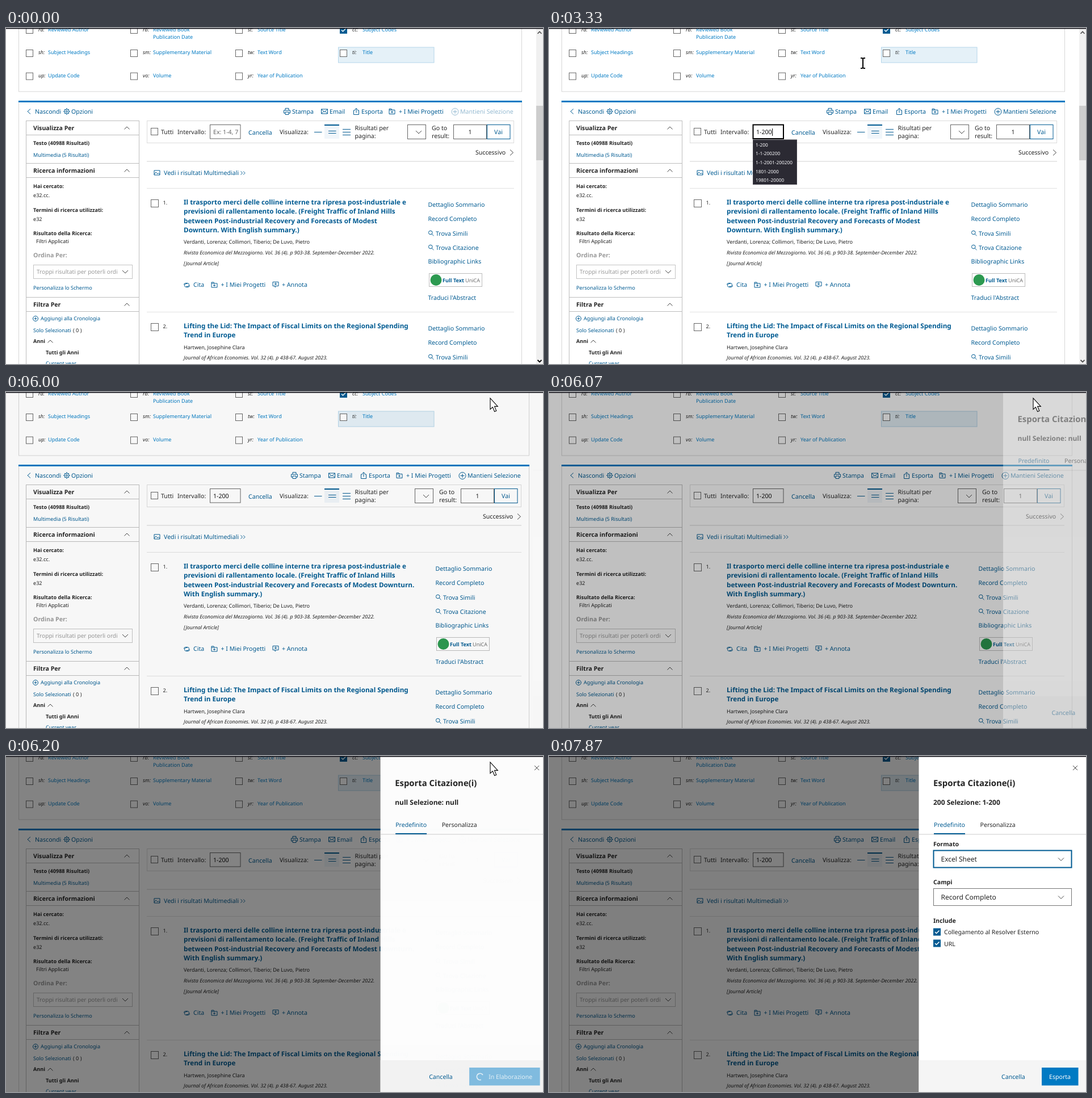
An HTML page for the animation above (8000 ms loop, 946 by 592 pixels).

```html
<!DOCTYPE html>
<html lang="it">
<head>
<meta charset="utf-8">
<title>Esporta citazioni</title>
<style>
html, body { margin: 0; width: 100%; height: 100%; overflow: hidden; background: #fff; }
svg { display: block; width: 946px; height: 592px; }
text { font: 10.6px "Noto Sans", "Open Sans", sans-serif; fill: #232323; text-rendering: geometricPrecision; }
text.s { font-size: 9.1px; }
text.b { font-weight: 600; }
text.i { font-size: 8.95px; font-style: italic; }
text.t { font-size: 11.7px; font-weight: 600; }
text.f { font-size: 12px; }
text.h { font-size: 14.9px; }
text.p { font-size: 10.1px; }
text.o { font-size: 8.3px; fill: #fbfbfe; }
text.m { text-anchor: middle; }
text.l { fill: #005b92; }
text.k { fill: #007ac3; }
text.g { fill: #999; }
text.w { fill: #fff; }
.ico { fill: none; stroke: #005b92; stroke-width: 1; }
.dark { stroke: #444; }
</style>
</head>
<body>
<svg id="stage" viewBox="0 0 946 592"></svg>
<script>
const BLUE = '#005b92', LOOP = 8000, SCROLLBAR = 13;

const text = (x, y, s, cls = '', more = '') => `<text x="${x}" y="${y}" class="${cls}" ${more}>${s}</text>`;
const rect = (x, y, w, h, fill = 'none', stroke = 'none', more = '') =>
  `<rect x="${x}" y="${y}" width="${w}" height="${h}" fill="${fill}" stroke="${stroke}" ${more}/>`;
const icon = (x, y, d, more = '') => `<path class="ico ${more}" transform="translate(${x} ${y})" d="${d}"/>`;
const group = (attrs, ...parts) => `<g ${attrs}>${parts.join('')}</g>`;
// A box whose right edge follows the page width
const wide = (x, y, w, h, fill, stroke) => rect(x, y, w, h, fill, stroke, `class="wide" data-w="${w}"`);
const box = (x, y, size = 12) => rect(x + .5, y + .5, size, size, '#fff', '#666');
const checked = (x, y) => rect(x, y, 13, 13, BLUE) +
  `<path d="M${x + 3} ${y + 6.5}l2.5 2.5 5-5" fill="none" stroke="#fff" stroke-width="1.5"/>`;

const UP = 'M-4.5 2.5L0-2 4.5 2.5', DOWN = 'M-5-2.5L0 2.5 5-2.5', RIGHT = 'M-3-5L2.5 0-3 5', LEFT = 'M3-4.5L-2 0 3 4.5';
const CIRCLE_PLUS = 'M-6 0a6 6 0 1 0 12 0a6 6 0 1 0-12 0M-3.5 0h7M0-3.5v7';
const FOLDER = 'M-5-2.5v7h10v-7zM-5-2.5v-2h4l1 2M-2 1h4M0-1v4';
const LENS = 'M-4-1a3.3 3.3 0 1 0 6.6 0a3.3 3.3 0 1 0-6.6 0M1.8 1.5L5 4.7';

function searchFields() {
  const cols = [35, 219, 404, 588], labelX = [74, 259, 443, 628];
  const rows = [
    [-3, 5.5, ['ra', 'Reviewed Author'], ['rb', 'Reviewed Book'], ['st', 'Source Title'], ['cc', 'Subject Codes']],
    [38, 45.5, ['sh', 'Subject Headings'], ['sm', 'Supplementary Material'], ['tw', 'Text Word'], ['ti', 'Title']],
    [78.5, 86.5, ['up', 'Update Code'], ['vo', 'Volume'], ['yr', 'Year of Publication']]
  ];
  const cells = rows.map(([boxY, y, ...fields]) => fields.map(([code, label], c) =>
    (code == 'cc' ? checked(cols[c], boxY) : box(cols[c], boxY)) +
    text(cols[c] + 22, y, code + ':', 'i') + text(labelX[c], y, label, 's k')).join(''));
  return wide(22.5, -5, 886, 117, '#fff', '#d6d6d6') + rect(585.5, 34, 168.5, 27, '#e5f1f8', '#b5d6ea') +
    cells.join('') + text(259, 19, 'Publication Date', 's k');
}

function sidebar() {
  const head = (y, label) => rect(35.5, y - 12.5, 199, 25, '#fff', '#bdbdbd') + text(48, y + 4, label, 'b') + icon(213, y, UP, 'dark');
  return rect(35.5, 163.5, 199, 440, '#fff', '#bdbdbd') +
    head(176, 'Visualizza Per') + head(251, 'Ricerca informazioni') + head(487, 'Filtra Per') +
    text(48, 206, 'Testo (40988 Risultati)', 's b') + text(48, 226.5, 'Multimedia (5 Risultati)', 's l') +
    text(48, 281.5, 'Hai cercato:', 's b') + text(48, 297.5, 'e32.cc.', 's') +
    text(48, 323.5, 'Termini di ricerca utilizzati:', 's b') + text(48, 340, 'e32', 's') +
    text(48, 365, 'Risultato della Ricerca:', 's b') + text(53, 379, 'Filtri Applicati', 's') +
    text(48, 403.5, 'Ordina Per:', 'b g') + rect(48.5, 417.5, 174, 24, '#fff', '#c4c4c4') +
    text(54, 433, 'Troppi risultati per poterli ordi', 'p g') + icon(210, 429.5, DOWN, 'dark') +
    text(48, 461, 'Personalizza lo Schermo', 's l') +
    icon(52, 512, 'M-4.5 0a4.5 4.5 0 1 0 9 0a4.5 4.5 0 1 0-9 0M-2.5 0h5M0-2.5v5') + text(61, 515, 'Aggiungi alla Cronologia', 's l') +
    text(48, 535.5, 'Solo Selezionati', 's l') + text(118, 535.5, '( 0 )', 's') +
    text(48, 554.5, 'Anni', 's b') + icon(78, 552, UP, 'dark') +
    text(70, 574.5, 'Tutti gli Anni', 's b') + text(70, 594, 'Current year', 's l');
}

function toolbar() {
  return icon(40, 147, LEFT) + text(51, 151, 'Nascondi', 'l') +
    icon(107, 147, 'M-4 0a4 4 0 1 0 8 0a4 4 0 1 0-8 0M-1.5 0a1.5 1.5 0 1 0 3 0a1.5 1.5 0 1 0-3 0M0-6v2M0 4v2M-6 0h2M4 0h2M-4-4l1 1M3 3l1 1M-4 4l1-1M3-3l1-1') +
    text(115, 151, 'Opzioni', 'l') +
    group('class="right"',
      icon(495, 147, 'M-3-2v-3.5h6V-2M-3 3h-2.5v-5h11v5H3M-3 1h6v4.5h-6z') + text(504, 151, 'Stampa', 'l'),
      icon(561, 147, 'M-5.5-4h11v8h-11zM-5.5-4L0 1 5.5-4M-5.5 4l4-4M5.5 4l-4-4') + text(570, 151, 'Email', 'l'),
      icon(617, 147, 'M-2-2h-2.5v7.5h9V-2H2M0 2.5v-8M-2.5-3L0-5.5 2.5-3') + text(626, 151, 'Esporta', 'l'),
      icon(680, 147, FOLDER) + text(692, 151, '+ I Miei Progetti', 'l'),
      group('id="keep"', icon(791, 147.5, CIRCLE_PLUS) + text(800, 151, 'Mantieni Selezione', 'l'))) +
    wide(248.5, 163.5, 646, 39, '#fff', '#dcdcdc') + box(255, 176) + text(273, 187, 'Tutti') + text(302, 187, 'Intervallo:') +
    rect(359.5, 170.5, 53.5, 24.5, '#fff', '#666', 'id="range"') + text(365, 187, '', '', 'id="typed"') +
    rect(366, 177, 1, 13, '#000', 'none', 'id="caret"') +
    text(427, 188, 'Cancella', 'l') + text(482, 187, 'Visualizza:') +
    rect(561, 170, 26, 25, '#f1f6fa') + rect(561, 170, 26, 2, BLUE) +
    icon(543, 183, 'M0 .5h13.5') + icon(568, 183, 'M0-1.5h13.5M0 2.5h13.5') + icon(593, 183, 'M0-4.5h14M0 .5h14M0 5.5h14') +
    text(614.5, 179.5, 'Risultati per') + text(614.5, 193.5, 'pagina:') +
    group('class="right"',
      rect(707.5, 170.5, 32, 25, '#fff', '#666'), icon(727, 183.5, DOWN, 'dark'),
      text(750, 179.5, 'Go to'), text(750, 193.5, 'result:'),
      rect(788.5, 170.5, 58, 25, '#fff', '#666', 'id="goto"'), text(817.5, 187, '1', 'm'),
      rect(847.5, 170.5, 40.5, 25, '#fff', BLUE), text(867.5, 187, 'Vai', 'l m'),
      text(827, 223, 'Successivo'), icon(891, 219.5, RIGHT, 'dark')) +
    wide(248, 234.5, 647, 1, '#d2d2d2') +
    icon(266, 255, 'M-5-4H5V4H-5zM-5 3l3-4 3 3 1.5-1.5L5 3') + text(278, 258.5, 'Vedi i risultati Multimediali', 'l') +
    icon(413.5, 255.5, 'M0-3l3 3-3 3M4.5-3l3 3-3 3');
}

function result(y, number, title, author, journal, journalY) {
  const lens = (dy, label) => icon(748.5, y + dy - 4.5, LENS) + text(757, y + dy, label, 'l');
  return wide(248, y - 33, 647, 1, '#e2e2e2') + box(255, y - 13, 13) + text(276.5, y - 4.5, number, 's') +
    title.map((s, n) => text(313, y - 4 + n * 16.4, s, 't l')).join('') +
    text(313, journalY - 18.5, author, 's') + text(313, journalY, journal, 'i') +
    group('class="right"', text(743.5, y, 'Dettaglio Sommario', 'l'), text(743.5, y + 25, 'Record Completo', 'l'),
      lens(51, 'Trova Simili'), lens(76, 'Trova Citazione'));
}

function results() {
  return result(315, '1.', [
      'Il trasporto merci delle colline interne tra ripresa post-industriale e',
      'previsioni di rallentamento locale. (Freight Traffic of Inland Hills',
      'between Post-industrial Recovery and Forecasts of Modest<tspan id="wrapped"></tspan>',
      '<tspan id="lastLine"></tspan>'],
      'Verdanti, Lorenza; Collimori, Tiberio; De Luvo, Pietro',
      'Rivista Economica del Mezzogiorno. Vol. 36 (4). p 903-38. September-December 2022.', 398.5) +
    text(313, 417.5, '[Journal Article]', 'i') +
    icon(318.5, 452.5, 'M-5 0a3 3 0 0 1 3-3h3a3 3 0 0 1 0 6h-2M5 1a3 3 0 0 1-3 3h-3a3 3 0 0 1 0-6h2') + text(330, 456, 'Cita', 'l') +
    icon(367, 452.5, FOLDER) + text(378.5, 456, '+ I Miei Progetti', 'l') +
    icon(475, 452, 'M-5-4.5H5v7H1L-1 5V2.5h-4zM-2.5-1h5M0-3.5v5') + text(486, 456, '+ Annota', 'l') +
    group('class="right"', text(743.5, 415, 'Bibliographic Links', 'l'),
      rect(745.5, 432.5, 93, 23, '#fff', '#bdbdbd'), '<circle cx="757.5" cy="444" r="10" fill="#2d9a51"/>',
      text(769, 447.5, 'Full Text', 's b l'), text(809, 447.5, 'UniCA', 's', 'opacity=".65"'),
      text(743.5, 478.5, "Traduci l'Abstract", 'l')) +
    result(533, '2.', ['Lifting the Lid: The Impact of Fiscal Limits on the Regional Spending', 'Trend in Europe'],
      'Hartwen, Josephine Clara', 'Journal of African Economies. Vol. 32 (4). p 438-67. August 2023.', 584);
}

function suggestions() {
  const items = ['1-200', '1-1-200200', '1-1-2001-200200', '1801-2000', '19801-20000', '1-250'];
  return group('id="list"', rect(359.5, 197, 77, 78.5, '#2b2a33', '#45444d', 'id="listBox"'),
    rect(360, 198, 76, 15.5, '#52525e', 'none', 'id="listHover"'),
    ...items.map((s, n) => text(364, 208.5 + n * 15.7, s, 'o', n == 5 ? 'id="extra"' : '')));
}

function drawer() {
  const select = (y, label, value, id) => text(677, y - 7, label, 'b') + rect(677.5, y + .5, 243, 30, '#fff', '#757575', `id="${id}"`) +
    text(690.5, y + 20, value, 'f') + icon(902, y + 16, DOWN, 'dark');
  return rect(651.5, 0, 420, 592, '#fff') + rect(651.5, 536, 420, 56, '#f5f5f5') +
    icon(927, 21, 'M-4-4L4 4M-4 4L4-4', 'dark') +
    text(677, 53, 'Esporta Citazione(i)', 'b h') + text(677, 86, '', 'b f', 'id="count"') +
    text(678, 125, 'Predefinito', 'l') + text(759.5, 125, 'Personalizza') +
    rect(651.5, 137.5, 420, 1, '#ccc') + rect(678, 136, 55, 2, BLUE) +
    group('id="form"', select(166, 'Formato', 'Excel Sheet', 'format'), select(233, 'Campi', 'Record Completo', 'fields'),
      text(677, 294, 'Include', 'b'), checked(677, 303.5), text(696, 314, 'Collegamento al Resolver Esterno'),
      checked(677, 323.5), text(696, 334.5, 'URL')) +
    group('id="busy"', text(737, 568.5, 'Cancella', 'l'), rect(808, 549, 124.5, 31.5, '#80bde1'),
      '<path id="spinner" d="M3.5-4.5A5.7 5.7 0 1 0 3.5 4.5" fill="none" stroke="#e4f1f9" stroke-width="1.8"/>',
      text(842, 568.5, 'In Elaborazione', 'w', 'opacity=".8"')) +
    group('id="ready"', text(797, 568.5, 'Cancella', 'l'), rect(868, 549, 64.5, 31.5, '#007ac3', 'none', 'id="export"'),
      text(881, 568.5, 'Esporta', 'w'));
}

const scrollbar = group('id="scrollbar"', rect(934, 0, 12, 592, '#f0f0f0'), rect(934, 137, 12, 96, '#cdcdcd'),
  '<path d="M936.5 10l3.5-3.5 3.5 3.5" fill="none" stroke="#505050" stroke-width="1.6"/>',
  '<path id="scrollDown" d="M936.5 585l3.5 3.5 3.5-3.5" fill="none" stroke-width="1.8"/>');
const cursors = '<path id="arrow" d="M0 0V19.5L4.4 15.6 7.6 23.5 10.8 22.2 7.6 14.4H13.3Z" fill="#fff" stroke="#000" stroke-width="1.1"/>' +
  group('id="beam" fill="none"', ...[['#fff', 3.6], ['#000', 2]].map(([c, w]) =>
    `<path d="M-4-9h2.5L0-8 1.5-9H4M0-8V8M-4 9h2.5L0 8 1.5 9H4" stroke="${c}" stroke-width="${w}"/>`));

document.getElementById('stage').innerHTML = rect(0, 0, 946, 592, '#fff') + searchFields() +
  wide(22.5, 129, 886, 480, '#fff', '#d6d6d6') + wide(22, 128, 887, 3, '#007ac3') +
  toolbar() + sidebar() + results() + suggestions() + scrollbar +
  rect(0, 0, 946, 592, '#000', 'none', 'id="shade"') + group('id="drawer"', drawer()) +
  cursors + rect(0, 0, 946, 1.6, '#1c1b22');

const $ = id => document.getElementById(id);
const all = selector => [...document.querySelectorAll(selector)];
const wides = all('.wide'), rights = all('.right');
const set = (id, attrs) => { for (const name in attrs) $(id).setAttribute(name, attrs[name]); };
const show = (id, on) => { $(id).style.display = on ? '' : 'none'; };
const clamp = v => Math.max(0, Math.min(1, v));
const within = (t, ...spans) => spans.some(([from, to]) => t >= from && t < to);
const latest = (t, steps) => steps.reduce((value, [at, next]) => t >= at ? next : value, '');

const cursorPaths = [
  [[730, 908, 165], [930, 735, 100], [1130, 610, 70], [1330, 553, 62], [4000, 553, 62], [4130, 545, 80], [4800, 545, 80], [4930, 673, 83]],
  [[5530, 853, 11], [6480, 853, 11]]
];

function cursorAt(t) {
  const path = cursorPaths.find(p => t >= p[0][0] && t < p[p.length - 1][0]);
  if (!path) return null;
  const n = path.findIndex(p => p[0] > t), [t0, x0, y0] = path[n - 1], [t1, x1, y1] = path[n];
  const k = (t - t0) / (t1 - t0);
  return [x0 + (x1 - x0) * k, y0 + (y1 - y0) * k];
}

function draw(t) {
  const focus = within(t, [1670, 5800]), hover = within(t, [1330, 1670]);
  const typed = latest(t, [[2600, '1'], [2870, '1-'], [3130, '1-2'], [3270, '1-20'], [3330, '1-200']]);
  $('typed').textContent = typed || 'Ex: 1-4, 7';
  $('typed').style.fill = typed ? '#111' : focus ? '#aaa' : '#666';
  set('range', { stroke: focus || hover ? '#000' : '#666', 'stroke-width': focus ? 2 : 1 });
  show('caret', within(t, [1670, 2200], [2600, 3800], [4400, 4930], [5530, 5800]));
  set('caret', { x: typed ? 365.5 + $('typed').getComputedTextLength() : 366 });
  set('keep', { opacity: within(t, [2600, 2870]) || t >= 3130 ? 1 : .42 });
  set('goto', { stroke: within(t, [5130, 5270]) ? '#000' : '#666' });

  show('list', within(t, [2670, 4400]));
  show('listHover', t >= 4130);
  show('extra', t < 3270);
  set('listBox', { height: t < 3270 ? 94.5 : 78.5 });

  const shift = t >= 5930 ? SCROLLBAR : 0;
  show('scrollbar', !shift);
  set('scrollDown', { stroke: t < 330 ? '#000' : '#505050' });
  wides.forEach(node => node.setAttribute('width', +node.dataset.w + shift));
  rights.forEach(node => node.setAttribute('transform', `translate(${shift})`));
  $('wrapped').textContent = shift ? ' Downturn.' : '';
  $('lastLine').textContent = (shift ? '' : 'Downturn. ') + 'With English summary.)';

  // The shade and the slide share one easing; the drawer fades in evenly
  const u = 1 - (1 - clamp((t - 5975) / 330)) ** 2, open = u * u * (3 - 2 * u);
  set('shade', { opacity: open / 2 });
  set('drawer', { opacity: clamp((t - 5980) / 225), transform: `translate(${294.5 * (1 - open)})` });
  set('spinner', { transform: `translate(827 565) rotate(${(t - 6130) * .288})` });
  $('count').textContent = (t < 6800 ? 'null' : '200') + ' Selezione: ' + (t < 6800 ? 'null' : '1-200');
  show('form', t >= 6800);
  show('busy', t < 6930);
  show('ready', t >= 6930);
  set('export', { fill: within(t, [7330, 7470]) ? BLUE : '#007ac3' });
  set('fields', { stroke: within(t, [7530, 7600]) ? BLUE : '#757575' });
  set('format', { stroke: t >= 7870 ? BLUE : '#757575', 'stroke-width': t >= 7870 ? 2 : 1 });

  const pos = cursorAt(t), beam = within(t, [1270, 4070]);
  show('arrow', pos && !beam);
  show('beam', pos && beam);
  if (pos) set(beam ? 'beam' : 'arrow', { transform: `translate(${pos})` });
}

const start = performance.now();
function tick() {
  draw((performance.now() - start) % LOOP);
  requestAnimationFrame(tick);
}
tick();
</script>
</body>
</html>
```
